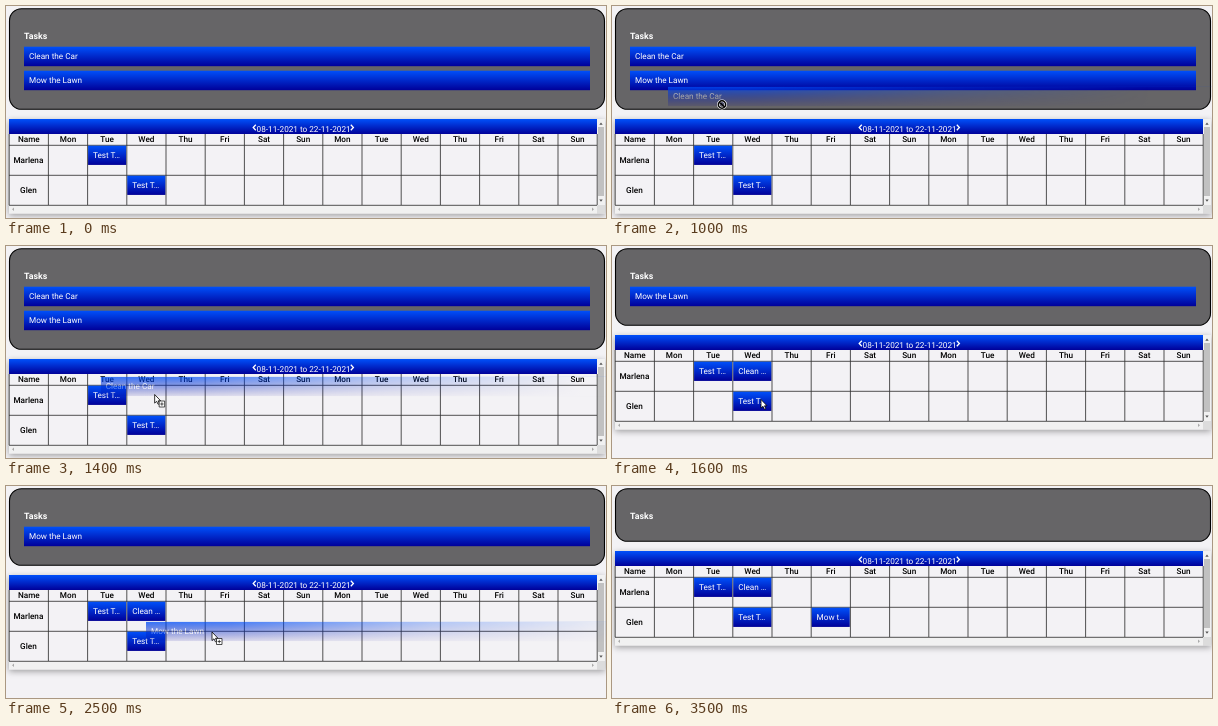
An HTML page for the animation above (3900 ms loop, 600 px wide and 212 px high).

```html
<!DOCTYPE html>
<html lang="en">
<head>
<meta charset="utf-8">
<title>Task planner</title>
<style>
  html, body { margin: 0; width: 100%; height: 100%; overflow: hidden; background: #f3f2f5; }
  svg { display: block; width: 600px; height: 212px; font: 8.2px Roboto, Arial, sans-serif; text-rendering: geometricPrecision; }
  text { fill: #fff; }
  .head { font-weight: 500; fill: #000; text-anchor: middle; }
  .box { filter: drop-shadow(0 2px 3px rgba(0, 0, 0, .35)); }
  .chip rect { filter: drop-shadow(0 .5px .6px rgba(0, 0, 0, .3)); }
</style>
</head>
<body>
<svg viewBox="0 0 600 212">
  <defs>
    <linearGradient id="blue" x2="0" y2="1">
      <stop stop-color="#0050fa"/><stop offset="1" stop-color="#000099"/>
    </linearGradient>
    <linearGradient id="down" x2="0" y2="1">
      <stop stop-color="#fff" stop-opacity=".8"/><stop offset="1" stop-color="#fff" stop-opacity=".1"/>
    </linearGradient>
    <linearGradient id="across">
      <stop stop-opacity="0"/><stop offset=".15" stop-opacity=".1"/>
      <stop offset=".5" stop-opacity=".65"/><stop offset=".85" stop-opacity="1"/>
    </linearGradient>
    <mask id="soft" maskContentUnits="objectBoundingBox">
      <rect width="1" height="1" fill="url(#down)"/><rect width="1" height="1" fill="url(#across)"/>
    </mask>
  </defs>
  <rect id="panel" x="3.5" y="2.7" width="595" rx="12" fill="#666567" stroke="#000" stroke-width="1.1"/>
  <text x="18" y="32.5" font-size="8.8" font-weight="700">Tasks</text>
  <g id="tasks"></g>
  <g id="table"></g>
  <g id="ghost" mask="url(#soft)"></g>
  <g id="cursor">
    <path id="arrow" d="M0 0V8.6L2 6.8L3.4 9.8L4.8 9.2L3.5 6.3H6Z" fill="#fff" stroke="#000" stroke-width=".8"/>
    <path id="plus" d="M4.5 6.5h5.5v6h-5.5zM5.6 9.5h3.3M7.25 7.8v3.4" fill="#fff" stroke="#222" stroke-width=".8"/>
    <g id="deny" fill="none">
      <circle r="3.7" stroke="#fff" stroke-width="2.6"/>
      <path d="M-2.6-2.6L2.6 2.6M3.7 0A3.7 3.7 0 1 1-3.7 0A3.7 3.7 0 1 1 3.7 0" stroke="#000" stroke-width="1.4"/>
    </g>
  </g>
</svg>
<script>
const $ = id => document.getElementById(id);
const LOOP = 3900, STEP = 100, COL = 39.2, ITEM = 24;
const days = ["Mon", "Tue", "Wed", "Thu", "Fri", "Sat", "Sun"];
const people = ["Marlena", "Glen"];
const jobs = [
  { name: "Clean the Car", short: "Clean …", col: 3, row: 0, grab: 800, drop: 1500 },
  { name: "Mow the Lawn", short: "Mow t…", col: 5, row: 1, grab: 2000, drop: 2700 }
];
// time, x, y of the pointer
const path = [
  [100, 250, 204], [600, 85, 71], [800, 72, 58.5], [1200, 148, 138.5], [1500, 149, 153.5],
  [1600, 149, 153.5], [2000, 84, 51], [2500, 206, 146], [2700, 218, 153], [2800, 218, 153],
  [3000, 290, 178], [3100, 296, 181], [3300, 296, 181]
];

const rect = (x, y, w, h, fill) => `<rect x="${x}" y="${y}" width="${w}" height="${h}" fill="${fill}"/>`;
const text = (x, y, s, cls = "") => `<text x="${x}" y="${y}" class="${cls}">${s}</text>`;
const bar = (y, s) => rect(18, y, 566, 19.5, "url(#blue)") + text(23, y + 12.3, s);
const chip = (col, row, s) => {
  const x = 3.7 + COL * col, y = 26.7 + 30 * row;
  return `<g class="chip">${rect(x, y, 38, 19.2, "url(#blue)")}${text(x + 4.9, y + 12.5, s)}</g>`;
};

function grid() {
  let lines = "", labels = "";
  for (let i = 0; i <= 15; i++) {
    const x = 3.2 + COL * i;
    lines += `M${x} 15V86`;
    if (i < 15) labels += text(x + COL / 2, 23.2, i ? days[(i - 1) % 7] : "Name", "head");
  }
  for (const y of [26.3, 56.3, 86.3]) lines += `M3 ${y}H591`;
  people.forEach((s, i) => labels += text(22.4, 44 + 30 * i, s, "head"));
  return `<g class="box">${rect(3, 0, 596, 94.5, "#f3f2f5")}</g>
    ${rect(591, 0, 8, 86, "#f1f1f1")}${rect(592, 8, 6, 69, "#c1c1c1")}
    ${rect(3, 86, 588, 8.5, "#f1f1f1")}${rect(591, 86, 8, 8.5, "#dcdcdc")}
    <path d="M593.3 5.8h3.4l-1.7-2.2zM593.3 80.5h3.4l-1.7 2.2z" fill="#555"/>
    <path d="M8 88.6v3.4l-2-1.7zM586 88.6v3.4l2-1.7z" fill="#aaa"/>
    <path d="${lines}" fill="none" stroke="#333" stroke-width=".85"/>
    ${rect(3, 0, 588, 15, "url(#blue)")}
    <path d="M249.8 5.7l-2.6 2.8l2.6 2.8M344.8 5.7l2.6 2.8l-2.6 2.8" fill="none" stroke="#fff" stroke-width="1.3"/>
    ${text(250.6, 12.6, "08-11-2021 to 22-11-2021")}${labels}
    ${chip(2, 0, "Test T…")}${chip(3, 1, "Test T…")}`;
}
const base = grid();

function pointer(t) {
  const i = path.findIndex(p => p[0] > t);
  if (i < 1) return null;
  const [t0, x0, y0] = path[i - 1], [t1, x1, y1] = path[i];
  const k = (t - t0) / (t1 - t0);
  return [x0 + (x1 - x0) * k, y0 + (y1 - y0) * k];
}

const show = (id, on) => $(id).setAttribute("visibility", on ? "visible" : "hidden");
const move = (id, x, y) => $(id).setAttribute("transform", `translate(${x} ${y})`);

function draw(t) {
  const open = jobs.filter(j => t < j.drop), done = jobs.filter(j => t >= j.drop);
  const top = 65 + ITEM * open.length;
  $("panel").setAttribute("height", top - 12.4);
  $("tasks").innerHTML = open.map((j, i) => bar(40.7 + ITEM * i, j.name)).join("");
  $("table").innerHTML = base + done.map(j => chip(j.col, j.row, j.short)).join("");
  move("table", 0, top);

  const at = pointer(t), held = jobs.find(j => t > j.grab && t < j.drop);
  const valid = at && at[1] > top + 26;
  if (at) move("cursor", ...at);
  show("arrow", at && (!held || valid));
  show("plus", held && valid);
  show("deny", held && !valid);
  show("ghost", held);
  if (held) {
    const [gx, gy] = pointer(held.grab);
    $("ghost").innerHTML = bar(40.7, held.name);
    move("ghost", at[0] - gx, at[1] - gy);
  }
}

let last = -1;
function tick() {
  const t = Math.floor(performance.now() % LOOP / STEP) * STEP;
  if (t !== last) draw(last = t);
  requestAnimationFrame(tick);
}
tick();
</script>
</body>
</html>
```
